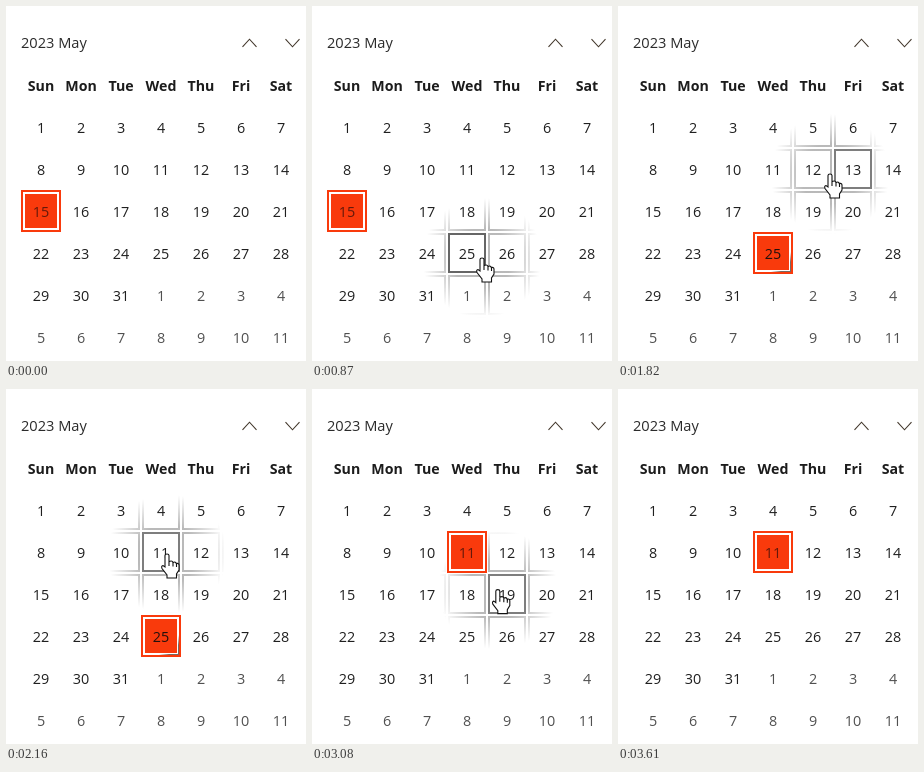
Animation of 300 by 355 pixels, one loop 4.07 s. Source, as an HTML page with a canvas:

```html
<!DOCTYPE html>
<html lang="en">
<head>
<meta charset="utf-8">
<title>Calendar</title>
<style>
html, body { margin: 0; width: 300px; height: 355px; overflow: hidden; background: #fff; }
canvas { display: block; }
</style>
</head>
<body>
<canvas id="stage" width="300" height="355"></canvas>
<script>
const ctx = document.getElementById('stage').getContext('2d');
const LOOP = 4070, LEFT = 15, TOP = 100, CELL_W = 40, CELL_H = 42, GLOW = 60;
const RED = '#f93a0c', GREY = '#7e7e7e';
const HEADS = ['Sun', 'Mon', 'Tue', 'Wed', 'Thu', 'Fri', 'Sat'];
const HAND = new Path2D('M-2 13V1.5Q-2 0 0 0T2 1.5V8Q2 7 4 7T6 9Q6 8 7.5 8T9.5 10' +
  'Q10 9 11 9.5T12 11V16L9.5 20V24H0V21L-5 14.5Q-6 12 -4 11.5L-2 13Z');
const KNUCKLES = new Path2D('M2 8V12M6 9V12.5M9.5 10V13');

// Pointer moves: start and end time, number of intervals, quadratic curve
const MOVES = [
  { start: 320, end: 800, steps: 7, curve: [[258, 320], [165, 261], [170, 252]] },
  { start: 1320, end: 1820, steps: 7, curve: [[170, 252], [243, 215], [212, 168]] },
  { start: 1880, end: 2160, steps: 4, curve: [[204, 169], [182, 172], [161, 165]] },
  { start: 2870, end: 3350, steps: 7, curve: [[162, 168], [172, 184], [265, 303]] },
  { start: 3420, end: 3610, steps: 3, curve: [[270, 317], [277, 335], [283, 372]] }
];

function bezier([a, b, c], p) {
  const q = 1 - p;
  return [0, 1].map(i => q * q * a[i] + 2 * p * q * b[i] + p * p * c[i]);
}

function pointerAt(t) {
  const move = MOVES.filter(m => t >= m.start).pop();
  if (!move || t >= 3610) return null;
  const { start, end, steps, curve } = move;
  const step = Math.min(steps, Math.floor((t - start) / (end - start) * steps + 0.1));
  // The hovered cell trails the pointer by part of a step
  const [hx, hy] = bezier(curve, Math.max(0, step - 0.9) / steps);
  const [x, y] = bezier(curve, step / steps);
  const col = Math.floor((hx - LEFT) / CELL_W), row = Math.floor((hy - TOP) / CELL_H);
  return { x, y, hover: row * 7 + col };
}

function text(str, x, y, color, weight = 400, size = 14.4, align = 'center') {
  ctx.font = `${weight} ${size}px "Open Sans", "Noto Sans", sans-serif`;
  ctx.textAlign = align;
  ctx.fillStyle = color;
  ctx.fillText(str, x, y);
}

function frame(x, y, inset, width, color) {
  const d = inset + width / 2;
  ctx.lineWidth = width;
  ctx.strokeStyle = color;
  ctx.strokeRect(x + d, y + d, CELL_W - 2 * d, CELL_H - 2 * d);
}

// Even in the middle, fading over the outer half
function radial(x, y, radius, rgb, alpha) {
  const g = ctx.createRadialGradient(x, y, radius / 2, x, y, radius);
  g.addColorStop(0, `rgba(${rgb},${alpha})`);
  g.addColorStop(1, `rgba(${rgb},0)`);
  return g;
}

function chevron(x, y, dy) {
  ctx.beginPath();
  ctx.moveTo(x - 7, y - dy);
  ctx.lineTo(x, y + dy);
  ctx.lineTo(x + 7, y - dy);
  ctx.lineWidth = 1.1;
  ctx.strokeStyle = '#43382c';
  ctx.stroke();
}

function drawSelected(x, y, shaded) {
  frame(x, y, 0, 2, RED);
  ctx.fillStyle = RED;
  ctx.fillRect(x + 4, y + 4, CELL_W - 8, CELL_H - 8);
  if (shaded) frame(x, y, 2, 1, radial(x + 38, y + 40, 20, '60,40,30', 0.7));
}

function drawHand({ x, y }) {
  ctx.save();
  ctx.translate(x, y);
  ctx.fillStyle = '#fff';
  ctx.strokeStyle = '#111';
  ctx.lineWidth = 1.1;
  ctx.fill(HAND);
  ctx.stroke(HAND);
  ctx.stroke(KNUCKLES);
  ctx.restore();
}

function draw(t) {
  const pointer = pointerAt(t);
  const selected = t < 1000 ? 14 : t < 2540 ? 24 : 10;
  const pressed = (t >= 870 && t < 1000) || (t >= 2410 && t < 2540);
  const glow = pointer && radial(pointer.x, pointer.y, GLOW, '128,128,128', 0.55);

  ctx.fillStyle = '#fff';
  ctx.fillRect(0, 0, 300, 355);
  text('2023 May', 15, 42, '#2b2b2b', 400, 14.6, 'left');
  chevron(243.5, 37, -3.8);
  chevron(286.5, 37, 3.8);
  HEADS.forEach((name, i) => text(name, 35 + i * CELL_W, 85, '#1c1c1c', 700, 14.2));

  for (let i = 0; i < 42; i++) {
    const x = LEFT + i % 7 * CELL_W, y = TOP + Math.floor(i / 7) * CELL_H;
    const isSelected = i === selected;
    if (isSelected) drawSelected(x, y, i === 24 && t >= 1390);
    else if (pointer && i === pointer.hover) frame(x, y, 1, 2, pressed ? '#666' : GREY);
    else if (pointer) frame(x, y, 1, 2, glow);
    const color = isSelected ? (i === 24 ? '#24100c' : '#64190b') : i > 30 ? '#505050' : '#1f1f1f';
    text(i % 31 + 1, x + 20, y + 27, color);
  }
  if (pointer) drawHand(pointer);
}

function tick(now) {
  draw(now % LOOP);
  requestAnimationFrame(tick);
}
requestAnimationFrame(tick);
</script>
</body>
</html>
```
